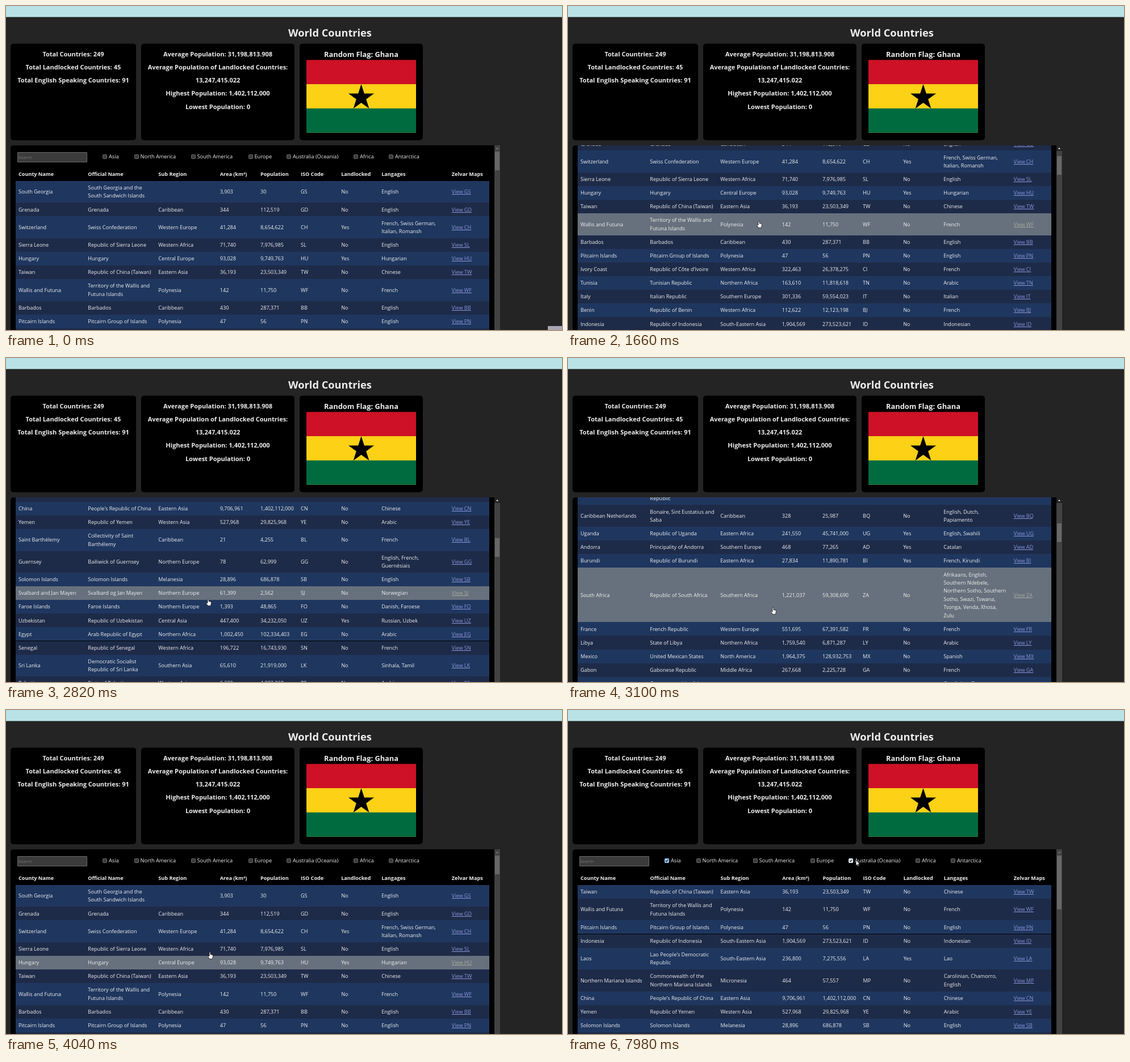
An HTML page that plays this animation: 979x572 px, repeating every 8000 ms.

```html
<!DOCTYPE html>
<html lang="en">
<head>
<meta charset="utf-8">
<title>World Countries</title>
<style>
  html, body { margin: 0; width: 100%; height: 100%; overflow: hidden; background: #242424; }
  #stage { position: absolute; left: 0; top: 0; width: 979px; height: 572px; overflow: hidden;
    background: #242424; color: #eee; font: 9.1px/14.4px "Open Sans", "Noto Sans", sans-serif; }
  #stage div, #stage svg { position: absolute; }
  .text, .cell { white-space: pre; }
  .center { width: 400px; text-align: center; font-weight: 700; }
  #panel { left: 8px; top: 246px; width: 852px; height: 326px; background: #000;
    border-radius: 5px 0 0 0; overflow: hidden; }
  #content { left: -8px; top: -246px; width: 860px; height: 1700px; }
  .table { left: 0; top: 0; }
  .head { font-weight: 700; }
  .row { left: 17px; width: 834px; background: #1f375f; }
  .row.even { background: #1e2b48; }
  .row.hover { background: #67717d; }
  .link { color: #8b94da; text-decoration: underline; text-decoration-thickness: .6px; text-underline-offset: 1px; }
  .hover .link { color: #a5aa9c; }
  #search { left: 19.5px; top: 257.5px; width: 121.5px; height: 16px; background: #3b3b3b;
    border: 1px solid #6b6b6b; border-radius: 1px; color: #757575; font-size: 7.6px; line-height: 16.5px; text-indent: 1px; }
  .box { top: 262px; width: 6px; height: 6px; border: 1px solid #6c6c6c; border-radius: 1.5px; background: #3b3b3b; }
  .box svg { left: 0; top: 0; display: none; }
  .box.on { background: #99c8ff; border-color: #99c8ff; }
  .box.on.hot { background: #eaf4ff; border-color: #eaf4ff; }
  .box.on svg { display: block; }
  #track { left: 860px; top: 246px; width: 10px; height: 326px; background: #424242; }
  #thumb { left: 1px; width: 8px; background: #686868; }
  #button { left: 0; top: 0; width: 10px; height: 10px; }
  #corner { left: 954px; top: 565px; width: 25px; height: 7px; background: #aaa5b4; }
</style>
</head>
<body>
<div id="stage">
  <svg width="979" height="572">
    <rect width="979" height="19.5" fill="#b8e2e6"/>
    <g id="cards">
      <rect x="8" y="66.5" width="221" height="170.5" rx="5"/>
      <rect x="238" y="66.5" width="270" height="170.5" rx="5"/>
      <rect x="517" y="66.5" width="217" height="170.5" rx="5"/>
    </g>
    <rect x="529" y="95.2" width="193" height="128.5" fill="#ce1126"/>
    <rect x="529" y="138" width="193" height="85.7" fill="#fcd116"/>
    <rect x="529" y="180.8" width="193" height="42.9" fill="#006b3f"/>
    <path id="star"/>
  </svg>
  <div id="panel"><div id="content"><div id="search">Search</div></div></div>
  <div id="track">
    <div id="button"><svg width="10" height="10"><path id="caret" d="M2.8 6.5L5 4L7.2 6.5Z"/></svg></div>
    <div id="thumb"></div>
  </div>
  <div id="corner"></div>
  <svg id="cursor" width="14" height="18" style="overflow:visible" stroke="#000" stroke-width=".7" fill="#fff">
    <path id="arrow" d="M0 0V9.8L2.2 7.8L3.7 11.2L5.2 10.5L3.8 7.2H6.9Z"/>
    <path id="hand" d="M-1 1.2a1 1 0 0 1 2 0V4.6L4.3 5.2Q5.6 5.6 5.4 7.2L4.5 12.5H-.4L-3.2 8.3Q-3.6 6.9-2.3 6.8L-1 8Z"/>
  </svg>
</div>
<script>
const LOOP = 8000, LINE = 14.4, ROW_PAD = 9.7, TABLE_TOP = 308.8;
const CLICK_ASIA = 5210, CLICK_OCEANIA = 6800;
const $ = id => document.getElementById(id);

// name; official; region; area; population; code; landlocked; languages; continent
const countries = `South Georgia;South Georgia and the|South Sandwich Islands;;3,903;30;GS;No;English
Grenada;Grenada;Caribbean;344;112,519;GD;No;English
Switzerland;Swiss Confederation;Western Europe;41,284;8,654,622;CH;Yes;French, Swiss German,|Italian, Romansh
Sierra Leone;Republic of Sierra Leone;Western Africa;71,740;7,976,985;SL;No;English
Hungary;Hungary;Central Europe;93,028;9,749,763;HU;Yes;Hungarian
Taiwan;Republic of China (Taiwan);Eastern Asia;36,193;23,503,349;TW;No;Chinese;A
Wallis and Futuna;Territory of the Wallis and|Futuna Islands;Polynesia;142;11,750;WF;No;French;O
Barbados;Barbados;Caribbean;430;287,371;BB;No;English
Pitcairn Islands;Pitcairn Group of Islands;Polynesia;47;56;PN;No;English;O
Ivory Coast;Republic of Côte d'Ivoire;Western Africa;322,463;26,378,275;CI;No;French
Tunisia;Tunisian Republic;Northern Africa;163,610;11,818,618;TN;No;Arabic
Italy;Italian Republic;Southern Europe;301,336;59,554,023;IT;No;Italian
Benin;Republic of Benin;Western Africa;112,622;12,123,198;BJ;No;French
Indonesia;Republic of Indonesia;South-Eastern Asia;1,904,569;273,523,621;ID;No;Indonesian;A
Cape Verde;Republic of Cabo Verde;Western Africa;4,033;555,988;CV;No;Portuguese
Saint Kitts and Nevis;Federation of Saint|Christopher and Nevis;Caribbean;261;53,192;KN;No;English
Laos;Lao People's Democratic|Republic;South-Eastern Asia;236,800;7,275,556;LA;Yes;Lao;A
Caribbean Netherlands;Bonaire, Sint Eustatius and|Saba;Caribbean;328;25,987;BQ;No;English, Dutch,|Papiamento
Uganda;Republic of Uganda;Eastern Africa;241,550;45,741,000;UG;Yes;English, Swahili
Andorra;Principality of Andorra;Southern Europe;468;77,265;AD;Yes;Catalan
Burundi;Republic of Burundi;Eastern Africa;27,834;11,890,781;BI;Yes;French, Kirundi
South Africa;Republic of South Africa;Southern Africa;1,221,037;59,308,690;ZA;No;Afrikaans, English,|Southern Ndebele,|Northern Sotho, Southern|Sotho, Swazi, Tswana,|Tsonga, Venda, Xhosa,|Zulu
France;French Republic;Western Europe;551,695;67,391,582;FR;No;French
Libya;State of Libya;Northern Africa;1,759,540;6,871,287;LY;No;Arabic
Mexico;United Mexican States;North America;1,964,375;128,932,753;MX;No;Spanish
Gabon;Gabonese Republic;Middle Africa;267,668;2,225,728;GA;No;French
Northern Mariana Islands;Commonwealth of the|Northern Mariana Islands;Micronesia;464;57,557;MP;No;Carolinian, Chamorro,|English;O
North Macedonia;Republic of North|Macedonia;Southeast Europe;25,713;2,077,132;MK;Yes;Macedonian
China;People's Republic of China;Eastern Asia;9,706,961;1,402,112,000;CN;No;Chinese;A
Yemen;Republic of Yemen;Western Asia;527,968;29,825,968;YE;No;Arabic;A
Saint Barthélemy;Collectivity of Saint|Barthélemy;Caribbean;21;4,255;BL;No;French
Guernsey;Bailiwick of Guernsey;Northern Europe;78;62,999;GG;No;English, French,|Guernésiais
Solomon Islands;Solomon Islands;Melanesia;28,896;686,878;SB;No;English;O
Svalbard and Jan Mayen;Svalbard og Jan Mayen;Northern Europe;61,399;2,562;SJ;No;Norwegian
Faroe Islands;Faroe Islands;Northern Europe;1,393;48,865;FO;No;Danish, Faroese
Uzbekistan;Republic of Uzbekistan;Central Asia;447,400;34,232,050;UZ;Yes;Russian, Uzbek;A
Egypt;Arab Republic of Egypt;Northern Africa;1,002,450;102,334,403;EG;No;Arabic
Senegal;Republic of Senegal;Western Africa;196,722;16,743,930;SN;No;French
Sri Lanka;Democratic Socialist|Republic of Sri Lanka;Southern Asia;65,610;21,919,000;LK;No;Sinhala, Tamil;A
Palestine;State of Palestine;Western Asia;6,220;4,803,269;PS;No;Arabic;A
Bangladesh;People's Republic of|Bangladesh;Southern Asia;147,570;164,689,383;BD;No;Bengali;A
Peru;Republic of Peru;South America;1,285,216;32,971,846;PE;No;Spanish
Singapore;Republic of Singapore;South-Eastern Asia;710;5,685,807;SG;No;English;A`
  .split("\n").map(line => line.split(";"));

const headings = ["County Name", "Official Name", "Sub Region", "Area (km²)", "Population",
  "ISO Code", "Landlocked", "Langages", "Zelvar Maps"];

function add(parent, className, style, text = "") {
  const el = document.createElement("div");
  el.className = className;
  el.textContent = text;
  for (const key in style) el.style[key] = style[key] + "px";
  return parent.appendChild(el);
}

function centered(x, y, size, text) {
  add($("stage"), "text center", { left: x - 200, top: y - 7, fontSize: size }, text);
}

centered(570.5, 47, 18.2, "World Countries");
["Total Countries: 249", "Total Landlocked Countries: 45", "Total English Speaking Countries: 91"]
  .forEach((text, i) => centered(118.5, 84.5 + i * 23.25, 11, text));
["Average Population: 31,198,813.908", "Average Population of Landlocked Countries:", "13,247,415.022",
  "Highest Population: 1,402,112,000", "Lowest Population: 0"]
  .forEach((text, i) => centered(373, 84.5 + i * 23.25, 11, text));
centered(625.5, 84.5, 12.8, "Random Flag: Ghana");

$("star").setAttribute("d", "M" + [0, 1, 2, 3, 4].map(i => {
  const a = i * Math.PI * 0.8;
  return `${625.5 + 23.7 * Math.sin(a)} ${161.8 - 23.7 * Math.cos(a)}`;
}).join("L") + "Z");

const filters = [["Asia", 170], ["North America", 225.5], ["South America", 325.5], ["Europe", 426.5],
  ["Australia (Oceania)", 494], ["Africa", 612], ["Antarctica", 674]].map(([name, x]) => {
  const box = add($("content"), "box", { left: x });
  box.innerHTML = '<svg width="6" height="6"><path d="M.8 3L2.4 4.7L5.3 1.2" fill="none" stroke="#222" stroke-width="1.3"/></svg>';
  const label = add($("content"), "text", { left: x + 11, top: 259, fontSize: 9.2 }, name);
  return { box, x, right: x + 11 + label.offsetWidth };
});

function buildTable(continents, columns, thumb) {
  const el = add($("content"), "table", {});
  headings.forEach((text, i) => add(el, "text head", { left: columns[i], top: 290 }, text));
  let top = TABLE_TOP;
  const rows = countries.filter(c => !continents || continents.includes(c[8] || "-")).map((c, index) => {
    const cells = [...c.slice(0, 8), "View " + c[5]].map(s => s.split("|"));
    const height = Math.max(...cells.map(s => s.length)) * LINE + ROW_PAD;
    const row = add(el, index % 2 ? "row even" : "row", { top, height });
    cells.forEach((lines, i) => add(row, i === 8 ? "cell link" : "cell",
      { left: columns[i] - 17, top: (height - lines.length * LINE) / 2 + 0.4 }, lines.join("\n")));
    const entry = { row, top, bottom: top + height };
    top += height;
    return entry;
  });
  return { el, rows, thumb };
}

const tables = [
  buildTable("", [22, 144.3, 268.3, 376.8, 448, 519, 590.2, 661.2, 784.8], 33),
  buildTable("A", [22, 140.4, 268, 379.7, 451, 522, 593, 664.2, 784.8], 148),
  buildTable("AO", [22, 144.6, 268.6, 377.3, 448.5, 519.5, 590.7, 661.8, 784.8], 95)
];

// [time, value...]
const scrollKeys = [[1380, 0], [1470, 40], [1540, 58], [1590, 80], [1660, 116], [1725, 116], [1870, 240],
  [2200, 620], [2450, 920], [2560, 954], [2760, 954], [2820, 917], [2885, 917], [3040, 650],
  [3240, 260], [3380, 80], [3440, 59.6], [3510, 59.6], [3600, 22], [3710, 0]];
const cursorKeys = [[310, 862, 518], [380, 720, 500], [450, 500, 470], [1050, 500, 470], [1180, 440, 440],
  [1400, 345, 385], [1660, 336, 379], [1900, 336, 379], [2560, 352, 418], [2760, 356, 425], [2885, 356, 425],
  [3100, 361, 440], [3440, 366, 450], [4039, 366, 450], [4040, 359, 427], [4100, 359, 427],
  [4400, 250, 330], [4640, 190, 252], [4810, 180, 260], [5000, 174, 264], [6019, 174, 264],
  [6020, 186, 265], [6080, 186, 265], [6300, 335, 277], [6580, 497, 264], [7979, 497, 264], [7980, 507, 265]];

function sample(keys, t) {
  const next = keys.findIndex(k => k[0] > t);
  if (next < 0) return keys[keys.length - 1].slice(1);
  if (next === 0) return keys[0].slice(1);
  const a = keys[next - 1], b = keys[next], p = (t - a[0]) / (b[0] - a[0]);
  return a.slice(1).map((v, i) => v + (b[i + 1] - v) * p);
}

const show = (el, on) => el.style.display = on ? "block" : "none";

function render(t) {
  const [scroll] = sample(scrollKeys, t);
  const [x, y] = sample(cursorKeys, t);
  const hoverY = sample(cursorKeys, t - 70)[1];   // row highlight trails the pointer
  const active = t < CLICK_ASIA ? 0 : t < CLICK_OCEANIA ? 1 : 2;
  const visible = t >= 310;
  let onRow = false;

  tables.forEach((table, i) => {
    show(table.el, i === active);
    if (i !== active) return;
    for (const { row, top, bottom } of table.rows) {
      const hit = visible && hoverY > 246 && hoverY + scroll >= top && hoverY + scroll < bottom;
      row.classList.toggle("hover", hit);
      onRow = onRow || hit;
    }
  });

  $("content").style.top = -246 - scroll + "px";
  $("thumb").style.top = 11 + scroll * 0.0665 + "px";
  $("thumb").style.height = tables[active].thumb + "px";
  $("button").style.background = scroll ? "#242424" : "#424242";
  $("caret").setAttribute("fill", scroll ? "#f0f0f0" : "#858585");

  filters.forEach(({ box, x: left, right }, i) => {
    box.classList.toggle("on", (i === 0 && active > 0) || (i === 4 && active > 1));
    box.classList.toggle("hot", y > 258 && y < 274 && x >= left && x <= right);
  });

  const hand = onRow && !(t >= 3400 && t < 4040);
  show($("corner"), t < 70);
  show($("cursor"), visible);
  show($("hand"), hand);
  show($("arrow"), !hand);
  $("cursor").style.left = x + "px";
  $("cursor").style.top = y + "px";
}

$("stage").append($("cursor"));
const start = performance.now();
function tick() {
  render((performance.now() - start) % LOOP);
  requestAnimationFrame(tick);
}
tick();
</script>
</body>
</html>
```
